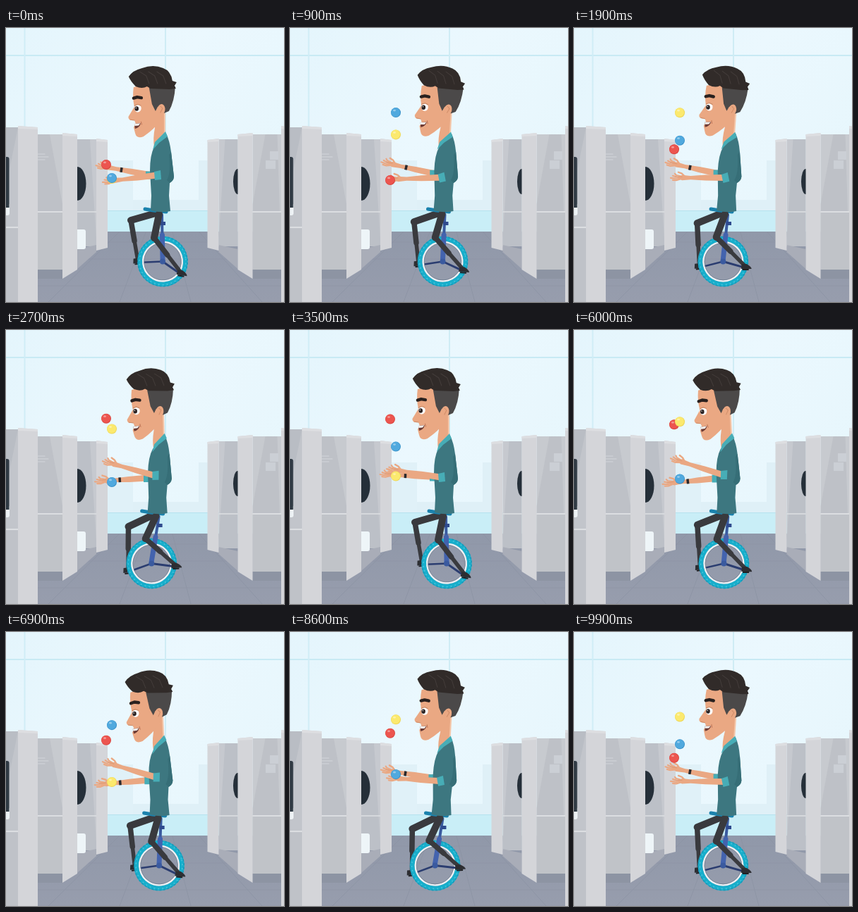
These frames come from a looping animation (394x389 px, 10 s). An HTML page with a canvas:

```html
<!DOCTYPE html>
<html lang="en">
<head>
<meta charset="utf-8">
<title>Unicycle juggler</title>
<style>
html, body { margin: 0; width: 100%; height: 100%; overflow: hidden; background: #e6f6fc; }
canvas { display: block; }
</style>
</head>
<body>
<canvas id="stage" width="394" height="389"></canvas>
<script>
const ctx = document.getElementById('stage').getContext('2d');
const TAU = Math.PI * 2;
const SKIN = '#eaa883', DARK = '#393a3e', HAIR = '#312b29', SHIRT = '#3d7780', CUFF = '#47adb6', STEEL = '#2b3d70';
const LOOP = 10000, STEP = 100;

// Turns of the two cycles (riding, juggling) at a few moments
const times = [0, 1900, 3500, 5000, 6900, 8600, 9900];
const rideTurns = [0, 1.73, 3, 4.23, 6.17, 7.62, 8.73];
const juggleTurns = [-.46, 1.02, 2.59, 4.21, 5.45, 6.91, 8.03];

const balls = [
  { color: '#ec554f', edge: '#d8443f', x: 142, lead: 1 },
  { color: '#fbe96e', edge: '#eed655', x: 150, lead: 0 },
  { color: '#50a9de', edge: '#3b92c9', x: 150, lead: -1 }
];

function keyed(list, t) {
  let i = 0;
  while (i < times.length - 2 && t > times[i + 1]) i++;
  const u = (t - times[i]) / (times[i + 1] - times[i]);
  return list[i] + (list[i + 1] - list[i]) * u;
}

function poly(color, ...p) {
  ctx.fillStyle = color;
  ctx.beginPath();
  for (let i = 0; i < p.length; i += 2) ctx.lineTo(p[i], p[i + 1]);
  ctx.closePath();
  ctx.fill();
}

function rect(color, x, y, w, h, r = 0) {
  ctx.fillStyle = color;
  ctx.beginPath();
  ctx.roundRect(x, y, w, h, r);
  ctx.fill();
}

function line(color, width, ...p) {
  ctx.strokeStyle = color;
  ctx.lineWidth = width;
  ctx.lineCap = ctx.lineJoin = 'round';
  ctx.beginPath();
  for (let i = 0; i < p.length; i += 2) ctx.lineTo(p[i], p[i + 1]);
  ctx.stroke();
}

function oval(color, x, y, rx, ry = rx, turn = 0) {
  ctx.fillStyle = color;
  ctx.beginPath();
  ctx.ellipse(x, y, rx, ry, turn, 0, TAU);
  ctx.fill();
}

function shape(color, d) {
  ctx.fillStyle = color;
  ctx.fill(new Path2D(d));
}

function placed(x, y, turn, paint) {
  ctx.save();
  ctx.translate(x, y);
  ctx.rotate(turn);
  paint();
  ctx.restore();
}

function room() {
  const sky = ctx.createLinearGradient(0, 0, 394, 260);
  sky.addColorStop(0, '#e4f5fc');
  sky.addColorStop(.5, '#ebf8fe');
  sky.addColorStop(1, '#e6f6fc');
  rect(sky, 0, 0, 394, 262);
  rect('#e0f1f8', 130, 188, 50, 74);
  rect('#dff0f7', 180, 244, 105, 18);
  rect('#dff0f7', 273, 188, 14, 74);
  rect('#c8eaf4', 0, 38, 394, 2);
  rect('#d0edf6', 25.5, 0, 2, 150);
  rect('#cfecf5', 225, 0, 2, 260);
  rect('#c9eef7', 0, 260, 394, 30);
  rect('#b5e2ee', 0, 259, 394, 1);
  const floor = ctx.createLinearGradient(0, 289, 0, 389);
  floor.addColorStop(0, '#9098a9');
  floor.addColorStop(1, '#979dad');
  rect(floor, 0, 289, 394, 100);
  for (let i = 0; i < 4; i++) line('#8c93a4', .8, 160 + 38 * i, 290, 60 + 101 * i, 389);
  for (const y of [304, 328, 366]) line('#8d94a5', .7, 45, y, 394, y);
}

// A post whose foot rises towards the aisle
function post(x, y, w, foot, rise) {
  poly('#d4d5d9', x, y, x + w, y + 2, x + w, foot - rise, x, foot);
  poly('#dddee1', x, y, x + w, y + 2, x + w, y + 5, x, y + 4);
}

function bays(chairY, chairW, chairH) {
  rect('#c6c9cf', 101, 158, 27, 152);
  poly('#bcc0c7', 101, 158, 119, 158, 128, 300, 128, 310, 101, 310);
  oval('#252f39', 101, chairY, chairW, chairH);
  line('#dddfe3', 1.5, 101, 261, 128, 261);
  poly('#a9adb8', 101, 314, 128, 308, 128, 318, 101, 342);
  post(128, 157, 16, 316, 4);
  rect('#c7cacf', 39, 151, 41, 192);
  poly('#bec1c7', 45, 151, 62, 151, 80, 250, 80, 343, 39, 343);
  rect('#c0c3c8', 39, 262, 41, 81);
  line('#dcdee1', 2, 39, 261, 80, 261);
  poly('#8d94a3', 39, 343, 80, 343, 80, 356, 39, 356);
  post(80, 149, 21, 356, 13);
}

function cubicles() {
  bays(221, 12.5, 24);
  rect('#eef5f8', 101, 286, 12, 28, [0, 3, 3, 0]);
  for (let i = 0; i < 3; i++) line('#d3d6db', 1, 43, 179 + 4 * i, 55 + 5 * (i % 2), 179 + 4 * i);
  rect('#c2c5cb', 0, 141, 17, 248);
  poly('#b9bdc4', 0, 141, 17, 141, 0, 225);
  rect('#edf2f5', 0, 250, 5, 16, [0, 0, 3, 0]);
  rect('#303a44', 0, 183, 4.5, 72, [0, 3, 0, 0]);
  line('#dcdee1', 2, 0, 283, 17, 283);
  rect('#bfc2c8', 0, 285, 17, 104);
  post(17, 139, 28, 389, 0);

  ctx.save();
  ctx.translate(429.5, 0);
  ctx.scale(-1, 1);
  bays(218, 6.5, 18);
  ctx.restore();
  rect('#cbcfd5', 368, 188, 14, 12);
  rect('#cbcfd5', 374, 175, 12, 12);
  post(390, 139, 12, 389, 0);
}

function shoe(x, y, tilt) {
  placed(x, y, tilt, () => {
    shape('#2d2e32', 'M-5 -4 L2 -4 Q9 0 9 3 L-6 3Z');
    rect('#1f2023', -4, 3, 9, 2);
  });
}

function leg(hx, hy, kx, ky, fx, fy) {
  line(DARK, 10, hx, hy, kx, ky);
  line(DARK, 7.5, kx, ky, (kx + fx) / 2, (ky + fy) / 2);
  line(DARK, 5.5, kx, ky, fx, fy);
}

function wheel(x, y, turn) {
  const ring = (r, width, color, ...dash) => {
    ctx.setLineDash(dash);
    ctx.lineCap = 'butt';
    ctx.lineWidth = width;
    ctx.strokeStyle = color;
    ctx.beginPath();
    ctx.arc(0, 0, r, 0, TAU);
    ctx.stroke();
    ctx.setLineDash([]);
  };
  placed(x, y, turn, () => {
    ring(32.3, 6.8, '#18aecb');
    ring(35, 1.6, '#1799b9', 3, 2.5);
    ring(33, 1.6, '#45c4da', 2, 4);
    ring(27.8, 2.4, '#eef2f5');
    ring(26.3, .7, '#747e90');
  });
}

function arm(ex, ey, hx, hy, watch) {
  const n = Math.hypot(hx - ex, hy - ey);
  placed(ex, ey, Math.atan2(hy - ey, hx - ex), () => {
    poly(SKIN, 0, -4.5, n * .35, -4, n * .62, -2.6, n - 17, -3.5, n - 11, 0, n - 17, 4, n * .62, 2.8, n * .35, 4, 0, 4.5);
    for (let i = -1; i < 3; i++) line(SKIN, 2.2, n - 17, i, n - 9, 2.4 * i - 1, n - 1 - 3 * Math.abs(i), 3 * i);
    line(SKIN, 2.4, n - 22, 1, n - 17, 6, n - 12, 8);
    line('#d8936f', .7, n - 17, 1.5, n - 8, 1.5);
    if (watch) rect('#29292d', n * .5, -3.4, 3.5, 6.8);
  });
}

function torso() {
  shape(SHIRT, 'M210 169 L227 150 Q232 160 234 176 L238 211 Q237 217 232 220 L231 238 L233 260 Q219 263 205 259 L206 238 L204 203 Q204 180 210 169Z');
  shape('#366e77', 'M231 180 Q234 206 228 216 L232 220 Q238 217 238 211 L234 176Z');
}

function head(blink) {
  shape('#f4c7aa', 'M216 112 L226 113 L226 151 L216 163Z');
  shape(SKIN, 'M209 112 L224 112 L224 149 Q216 156 210 169 Q208 157 211 142Z');
  shape(SKIN, 'M181 84 L207 78 L222 106 L220 130 Q211 143 195 154 Q185 158 183 149 L181 141 L184 136 L182 131 Q173 132 173.5 126 L182 112 Q179 98 181 84Z');
  shape('#4b4949', 'M203 85 L240 83 Q239 104 231 118 L224 121 Q223 108 215 112 L212 118 L207 108Z');
  oval(SKIN, 220, 116, 5.5, 8, .15);
  line('#d08d69', 1, 219, 111, 222, 114, 219, 120);
  shape(HAIR, 'M174 69 Q180 60 193 57 Q209 51 223 57 Q234 61 236 75 L242 77 L239 82 L241 86 L232 87 L205 86 L200 83 Q193 87 184 83 Q177 76 174 69Z');
  for (let x = 190; x < 220; x += 12) line('#443d3b', 1, x, 62, x + 9, 68, x + 13, 79);
  line('#29211f', 4.4, 181, 99.5, 186, 98, 192, 99);
  if (blink) {
    oval('#d79773', 186.5, 114, 5, 5.6);
    line('#3e2b25', 1.4, 182, 117, 186, 119, 191, 117);
  } else {
    oval('#fff', 187, 114, 4.8, 5.4);
    oval('#2b2323', 185.3, 114.5, 2.8, 3.2);
    oval('#fff', 184.5, 113.4, .7);
    line('#c98964', 1.2, 182.5, 110, 187, 108.4, 191, 110);
  }
  shape('#6b3a34', 'M182 136 L191 135 Q190 141 183 143Z');
  poly('#f4f1ee', 182, 136, 190.5, 135.2, 188, 138.5, 182.5, 139);
  line('#b86e51', .9, 191.5, 133, 192.5, 137);
  line('#cf8b67', 1, 176, 130, 182, 131);
}

// Flight near whole turns, a short rest in the hand between them
function ballY(turn) {
  const d = Math.abs(turn - Math.round(turn));
  return d < .4 ? 120 + 540 * d * d : 206 + 10 * Math.sin((d - .4) * 5 * Math.PI);
}

function draw(t) {
  const angle = keyed(rideTurns, t) * TAU;
  const juggle = keyed(juggleTurns, t);
  const sway = Math.sin(angle);
  const settle = Math.exp(-t / 600);
  const wx = 212.5 + 9.5 * Math.cos(angle), wy = 331.5;
  const w = (222 - wx) / 18;
  const hip = -5 * w;
  const neck = -2.2 * sway;

  room();
  cubicles();

  const farFoot = [187 - 16 * w, 331 + 12 * w];
  const nearFoot = [247 - 9 * w, 346 - 15 * w];
  leg(212 + hip, 263, 177 - 4 * w, 273 + 7 * w, ...farFoot);
  shoe(farFoot[0] - 1, farFoot[1], -.1);
  line(STEEL, 2.5, farFoot[0], farFoot[1] + 2, wx, wy);
  wheel(wx, wy, wx / 36);
  const seat = 221 + hip;
  line('#3a5a9f', 4, seat, 265, wx, wy);
  line('#4363ae', 7, wx + (seat - wx) * .55, 294, wx, wy - 3);
  rect('#2f4b8e', seat - 2, 275, 7, 5);
  line(STEEL, 3, wx, wy, nearFoot[0], nearFoot[1] + 3);
  oval('#3a5a9f', wx, wy, 4);
  line('#1b82ad', 5, 197 + hip, 257, 209 + hip, 259, 227 + hip, 261);
  leg(217 + hip, 264, 210 - 14 * w, 298 - 2 * w, ...nearFoot);
  shoe(nearFoot[0] + 1, nearFoot[1] + 2, .15 - .25 * w);

  const mid = (neck + hip) / 2;
  const farElbow = 208.5 + 2 * sway, nearElbow = 209 - 3.5 * sway;
  arm(204 + mid, farElbow, 126.5 - 2 * sway, 205 + 14 * sway - 10 * settle, true);
  rect(CUFF, 198 + mid, farElbow - 5, 8, 11);

  // lean the shirt between hips and neck
  const lean = (neck - hip) / 112;
  ctx.save();
  ctx.transform(1, 0, -lean, 1, hip + lean * 262, 0);
  torso();
  ctx.restore();

  placed(216 + neck / 2, 165, .01 - .06 * Math.sin(angle + .2), () => {
    ctx.translate(-216, -165);
    head(t >= 4900 && t <= 5000);
    poly(CUFF, 208, 173, 211, 162, 226, 147, 229, 154, 217, 163);
  });

  arm(213 + mid, nearElbow, 136, 197 - 15 * sway + 22 * settle, false);
  placed(215 + mid, nearElbow, .12 * sway, () => poly(CUFF, -5, -5, 4, -7, 5, 6, -4, 7));

  // the balls start together and spread out
  const gap = .3 - .21 * settle;
  for (const b of balls) {
    const y = ballY(juggle + b.lead * gap);
    oval(b.edge, b.x, y, 7);
    oval(b.color, b.x - .3, y - .4, 6.4);
    oval('rgba(255,255,255,.4)', b.x - 2, y - 3, 2, 1.4);
  }
}

const start = performance.now();
function tick() {
  const now = (performance.now() - start) % LOOP;
  draw(Math.floor(now / STEP) * STEP);
  requestAnimationFrame(tick);
}
tick();
</script>
</body>
</html>
```
